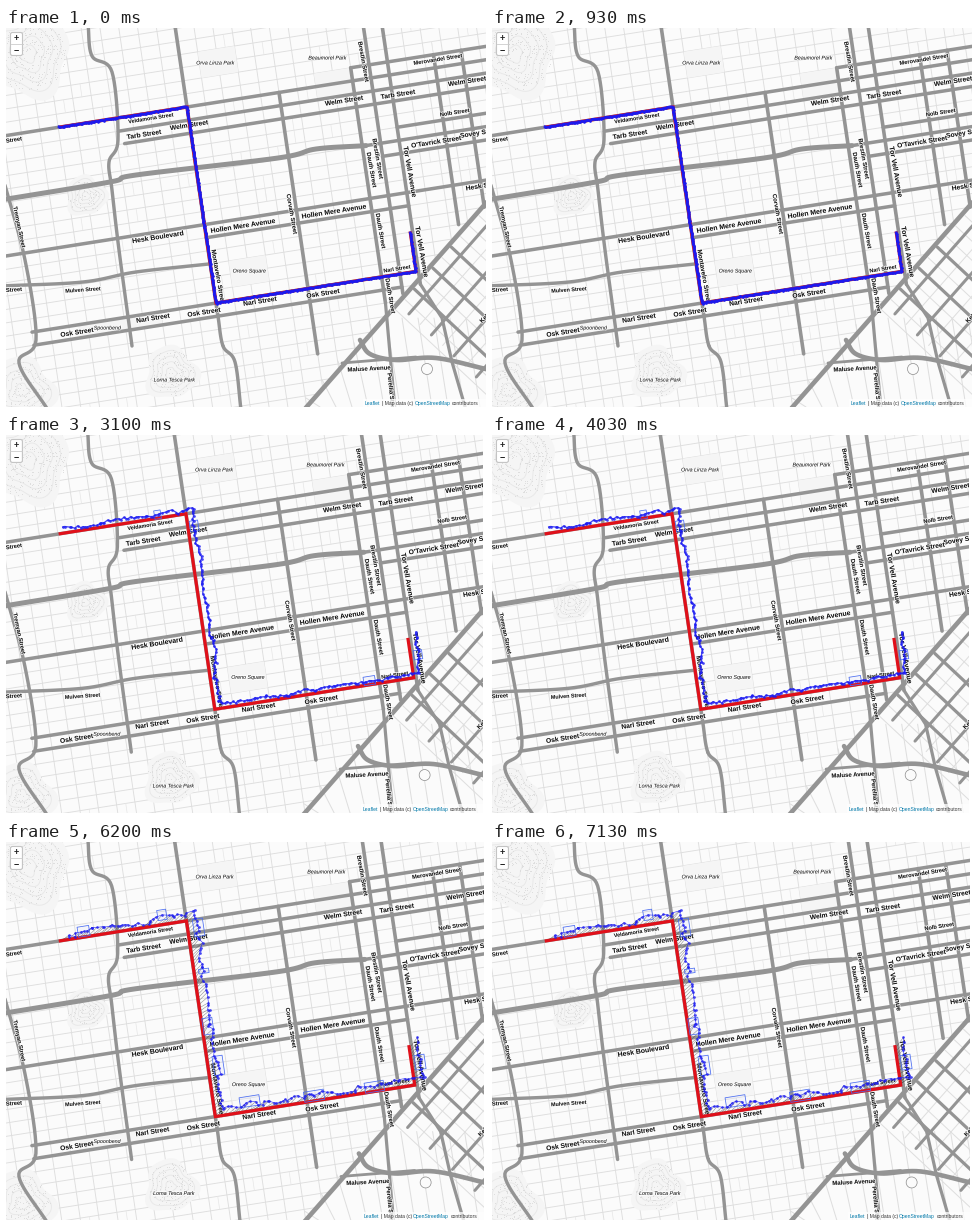
Animation of 480 by 379 pixels, one loop 7750 ms. Source, as a matplotlib script:

```python
import numpy as np
import matplotlib.pyplot as plt
from matplotlib.animation import FuncAnimation
from matplotlib.collections import LineCollection, PolyCollection
from matplotlib.patches import Circle, FancyBboxPatch, Polygon, Rectangle
from matplotlib.patheffects import withStroke

W, H, DPI = 480, 379, 100
PX = 72 / DPI
MAJOR, MINOR, PAPER = "#949494", "#dedede", "#fbfbfb"
BLOCK_X, BLOCK_Y, FIRST_ROW = 18.4, 13.07, 79
TILT_X, TILT_Y = 0.148, -0.158
LAST = 4                       # index of the final stage
FAR = 20                       # a column beyond the right edge

plt.rcParams["font.family"] = "Liberation Sans"
fig = plt.figure(figsize=(W / DPI, H / DPI), dpi=DPI, facecolor="white")
ax = fig.add_axes([0, 0, 1, 1])
ax.axis("off")


def at(col, row):
    """City block coordinates to page pixels."""
    a, b = col * BLOCK_X, FIRST_ROW + row * BLOCK_Y
    return 169.3 + a + TILT_X * b, b + TILT_Y * a


def street_y(x, row):
    """Height of an east-west street where it passes x."""
    b = FIRST_ROW + row * BLOCK_Y
    return b + TILT_Y * (x - 169.3 - TILT_X * b)


def street_x(y, col):
    """Position of a north-south street where it passes y."""
    a = col * BLOCK_X
    return 169.3 + a + TILT_X * (y - TILT_Y * a)


def road(points, width=3.6, color=MAJOR, z=3):
    ax.plot(*np.transpose(points), color=color, lw=width * PX, zorder=z,
            solid_capstyle="round", solid_joinstyle="round")


def area(points, color, z):
    ax.add_patch(Polygon(points, fc=color, ec="none", zorder=z))


def smooth(*points):
    """Rounded curve through a few points."""
    p = np.array(points, float)
    p = np.vstack([2 * p[0] - p[1], p, 2 * p[-1] - p[-2]])
    t = np.linspace(0, 1, 12)[:, None]
    return np.vstack([0.5 * (2 * q1 + (q2 - q0) * t
                             + (2 * q0 - 5 * q1 + 4 * q2 - q3) * t**2
                             + (3 * q1 - q0 - 3 * q2 + q3) * t**3)
                      for q0, q1, q2, q3 in zip(p, p[1:], p[2:], p[3:])])


def hill(x, y, radius, seed):
    """Pale relief: wobbly contours with fine speckle."""
    rng = np.random.default_rng(seed)
    t = np.linspace(0, 2 * np.pi, 90)
    wob = radius * (1 + 0.12 * np.sin(3 * t + seed) + 0.07 * np.sin(5 * t + 2 * seed))
    outline = np.c_[wob * np.cos(t), wob * np.sin(t)]
    area(outline + (x, y), "#f5f5f5", 2)
    for k in np.arange(0.2, 1, 0.2):
        road(outline * k + (x, y), 0.9, "#e8e8e8", 2.1)
    r, th = radius * np.sqrt(rng.random((2, radius**2 // 5)))
    th *= 2 * np.pi / radius * 5
    ax.scatter(x + 0.9 * r * np.cos(th), y + 0.9 * r * np.sin(th), s=0.5,
               color="#dddddd", lw=0, zorder=2.2)


def draw_minor():
    for col in range(-12, FAR):
        road([at(col, -11), at(col, 28)], 0.9, MINOR, 1)
    for row in range(-10, 30):
        road([at(-12, row), at(FAR, row)], 0.9, MINOR, 1)
    rng = np.random.default_rng(4)
    for col, row in zip(rng.integers(-9, 16, 70) + 0.5, rng.integers(-6, 22, 70)):
        road([at(col, row), at(col, row + 1)], 0.7, "#e6e6e6", 1)


def draw_parks():
    for x, y, radius in ((22, 26, 42), (80, 168, 20), (16, 362, 32), (165, 345, 26)):
        hill(x, y, radius, radius)
    for col, row, cols, rows in ((1, -4, 2, 2), (7, -1, 2, 2), (1, 12, 2, 2), (-7.5, 15, 4.5, 1)):
        area([at(col, row), at(col + cols, row), at(col + cols, row + rows),
              at(col, row + rows)], "#f5f5f5", 2)


def draw_diagonals():
    """District beyond the diagonal avenue, turned about 45 degrees."""
    corner, along, across = np.array([385, 283]), np.array([0.66, -0.75]), np.array([0.75, 0.7])
    start, end = corner - 140 * along, corner + 150 * along
    area([start, corner, end, (500, 400), (280, 400)], PAPER, 1.5)
    road([start, corner, end], 4.6)
    for k in range(1, 12):
        p = corner + along * (14 * k - 10) + across * 3
        major = k in (3, 5, 7)
        road([p, p + 150 * across], 3.2 if major else 1, MAJOR if major else MINOR,
             3 if major else 1.6)
    for k in range(1, 9):
        p = corner + across * 15 * k
        major = k % 2 == 1
        road([p + 10 * along, p + 150 * along], 3 if major else 1,
             MAJOR if major else MINOR, 3 if major else 1.6)
    for k in range(12):
        x = 300 + 16 * k
        road([(x, max(290, 370 - 1.15 * (x - 300))), (x + 14, H)], 1, MINOR, 1.6)


def draw_major():
    rows = ((-1, 9, FAR), (0, -11, FAR), (1, -3.8, FAR), (2, -3.6, FAR), (4, 11, FAR),
            (5, 9.2, FAR), (6, 10, FAR), (9, -11, FAR), (10, 0, 11),
            (15, -10, 11), (16, -10, 10))
    for row, west, east in rows:
        road([at(west, row), at(east, row)], 3.5)
    for col, north, south in ((0, -7, 16), (5, 0, 20), (9, -1, 17), (10, -7, 16.5),
                              (11, -7, 16), (13.5, -1, 12), (15, -1, 11)):
        road([at(col, north), at(col, south)], 3.6)
    road(smooth((-5, 172), (104, 154), (130, 147), (272, 130), (310, 121), at(9.2, 5)), 5)
    road(smooth((-5, 258), (77, 254), (130, 244), at(0, 12)), 3.4)
    road(smooth((82, -4), (86, 28), (106, 44), (112, 112), (103, 134), (106, 162),
                (113, 222), (126, 318)), 3.4)
    road(smooth((-3, 150), (19, 232), (30, 312), (13, 335), (42, 382)), 3.4)
    road(smooth(at(0, 16), (217, 318), (229, 334), (235, 382)), 3.4)
    road(smooth((354, 312), (364, 326), (390, 332), (430, 330), (484, 342)), 4.6)
    road([at(11, 16), (436, 290), (446, 334), (460, 382)], 3.2)
    road([at(9, 17), (389, 382)], 3.2)
    road([(336, 335), (410, 329)], 2.8)
    ax.add_patch(Circle((421, 341), 5.5, fc=PAPER, ec="#8a8a8a", lw=0.5, zorder=4))


def label(text, x, y, size=6.7, angle=0, **style):
    style = {"weight": "bold", "color": "#111111", **style}
    ax.text(x, y, text, size=size * PX, rotation=angle, rotation_mode="anchor",
            ha="center", va="center", zorder=6, clip_on=True,
            path_effects=[withStroke(linewidth=1.2, foreground="white", alpha=0.8)], **style)


def draw_labels():
    above, below = -5.5, 5.7
    rows = (("Merovandel Street", -1, below, 5.7, (432,)),
            ("Veldamoria Street", 0, below, 5.4, (145,)),
            ("Street", 0, below, 5.7, (8,)),
            ("Welm Street", 1, below, 6.7, (183, 338, 461)),
            ("Tarb Street", 2, above, 6.7, (138, 392)),
            ("Nolb Street", 4, above, 5.6, (449,)),
            ("Sovey Street", 5, below, 6.7, (474,)),
            ("O'Tavrick Street", 6, above, 6.7, (430,)),
            ("Hesk Street", 9, below, 6.7, (478,)),
            ("Hesk Boulevard", 9, below, 6.9, (152,)),
            ("Hollen Mere Avenue", 10, above, 6.9, (237, 328)),
            ("Narl Street", 15, below, 6.7, (147, 254)),
            ("Narl Street", 15, above, 5.4, (391,)),
            ("Osk Street", 16, above, 6.7, (71, 198, 317)))
    for text, row, side, size, places in rows:
        for x in places:
            label(text, x, street_y(x, row) + side, size, 9)
    left, right = -5.5, 5.5
    cols = (("Brestlin Street", 10, left, 6, (34, 131)), ("Dauth Street", 9, right, 6, (142, 203, 268)),
            ("Tor Vell Avenue", 11, right, 7, (144, 224)), ("Corvath Street", 5, left, 5.9, (186,)),
            ("Montavelro Street", 0, right, 6.4, (248,)))
    for text, col, side, size, places in cols:
        for y in places:
            label(text, street_x(y, col) + side, y, size, -80)
    for text, x, y in (("Orva Linza Park", 209, 35), ("Beaumorel Park", 321, 30),
                       ("Oreno Square", 243, 243), ("Lorna Tesca Park", 168, 352),
                       ("Spoonbend", 101, 300)):
        label(text, x, y, 5.3, weight="normal", style="italic")
    label("Tremyan Street", 13, 199, 5.8, -78)
    label("Mulven Street", 77, 262, 5.4, 4)
    label("Street", 8, 262, 5.7, 4)
    label("Maluse Avenue", 363, 341, 6, 3)
    label("Perellia Street", 385, 365, 6, -84)
    label("Kelm", 480, 289, 6, 45)


def draw_controls():
    ax.add_patch(FancyBboxPatch((4.5, 4.5), 12, 23, boxstyle="round,pad=0,rounding_size=2",
                                fc="white", ec="#c4c4c4", lw=0.8, zorder=12))
    ax.plot([4.5, 16.5], [16, 16], color="#cccccc", lw=0.6, zorder=13)
    for y, sign in ((10.3, "+"), (21.5, "\u2212")):
        ax.text(10.5, y, sign, size=9 * PX, weight="bold", color="#222222",
                ha="center", va="center", zorder=14)


def draw_credit():
    ax.add_patch(Rectangle((357, 370.5), 123, 8.5, fc="white", alpha=0.75, ec="none", zorder=11))
    style = dict(size=5 * PX, zorder=12, va="bottom")
    link, plain = "#0078a8", "#333333"
    last = ax.annotate("Leaflet", (359, 378), color=link, **style)
    for text, color in (("| Map data (c)", plain), ("OpenStreetMap", link),
                        ("contributors", plain)):
        last = ax.annotate(text, (1, 0), xycoords=last, xytext=(1.4 * PX, 0),
                           textcoords="offset points", color=color, **style)


ROUTE = np.array([at(-6.96, 0), at(0, 0), at(0, 15), at(10.87, 15), at(10.87, 11.94)])
STOPS = (0.84, 0.17, 0.96, 0.26, 0.43, 0.62, 0.5, 0.74, 0.34, 0.03)


def along_route(step):
    """Evenly spaced points on the planned route."""
    dist = np.r_[0, np.cumsum(np.hypot(*np.diff(ROUTE, axis=0).T))]
    s = np.arange(0, dist[-1], step)
    return np.c_[np.interp(s, dist, ROUTE[:, 0]), np.interp(s, dist, ROUTE[:, 1])]


def track(stage):
    """Planned points and their noisy fixes; error eases out towards the last stage."""
    error = (stage / LAST) ** 0.55
    step = 1.7 + 0.4 * stage
    rng = np.random.default_rng(20 + stage)
    base = along_route(step)
    kernel = np.hanning(int(24 / step))
    kernel /= np.linalg.norm(kernel)
    drift = np.column_stack([np.convolve(rng.normal(size=len(base)), kernel, "same")
                             for _ in range(2)])
    noise = 1.4 * drift * error + rng.normal(size=base.shape) * (0.25 + 0.7 * error)
    return base, base + np.array([9, -7.5]) * error + noise


def search_boxes(stage, base, pts):
    """Boxes lying along the track; every stage opens three more."""
    rng = np.random.default_rng(9)
    quads = []
    for stop in STOPS[:max(0, 3 * stage - 2)]:
        i = int(stop * len(base))
        d = base[i + 1] - base[i]
        d /= np.hypot(*d)
        u = d * (2 + rng.random() * 2.2 * stage)
        v = np.array([-d[1], d[0]]) * (3.5 + 0.4 * stage)
        quads.append(pts[i] + [-u - v, u - v, u + v, v - u])
    return quads


ax.add_patch(Rectangle((0, 0), W, H, fc=PAPER, ec="none", zorder=0))
for draw in (draw_minor, draw_parks, draw_diagonals, draw_major, draw_labels,
             draw_controls, draw_credit):
    draw()
for corner, w, h in (((W, -5), 20, 420), ((-5, H), 520, 20)):
    ax.add_patch(Rectangle(corner, w, h, fc="white", ec="none", zorder=20))
top, bottom = (ax.plot([0, 1], [y, y], transform=ax.transAxes, color="#222222",
                       lw=PX, zorder=21)[0] for y in (1 - 0.5 / H, 0.5 / H))

ties = LineCollection([], colors="#333333", lw=0.35, alpha=0.6, zorder=7)
red, = ax.plot(*ROUTE.T, color="#e0101a", lw=3.2 * PX, zorder=8,
               solid_capstyle="butt", solid_joinstyle="miter")
boxes = PolyCollection([], facecolors=(0.2, 0.3, 1, 0.04), edgecolors="#4a6cf0",
                       lw=0.55, zorder=9)
ax.add_collection(ties)
ax.add_collection(boxes)
blue, = ax.plot([], [], color="#1a1af2", zorder=10, marker="o", mew=0, ms=2.7 * PX)


def update(stage):
    scale = 0.992 + 0.0012 * stage if stage else 1
    ax.set_xlim(0, W / scale)
    ax.set_ylim(2 * H / (1 + scale), 0)
    base, pts = track(stage)
    blue.set_data(*pts.T)
    blue.set_linewidth(2.6 * PX * 0.72**stage)
    blue.set_alpha(0.8 if stage else 0.92)
    ties.set_segments(np.stack([base, pts], axis=1) if stage > 2 else [])
    boxes.set_verts(search_boxes(stage, base, pts))
    top.set_visible(stage == 1)
    bottom.set_visible(stage in (1, 2))
    return blue, red, ties, boxes, top, bottom


anim = FuncAnimation(fig, update, frames=LAST + 1, interval=1550,
                     repeat=True, repeat_delay=0, blit=False)
plt.show()
```
